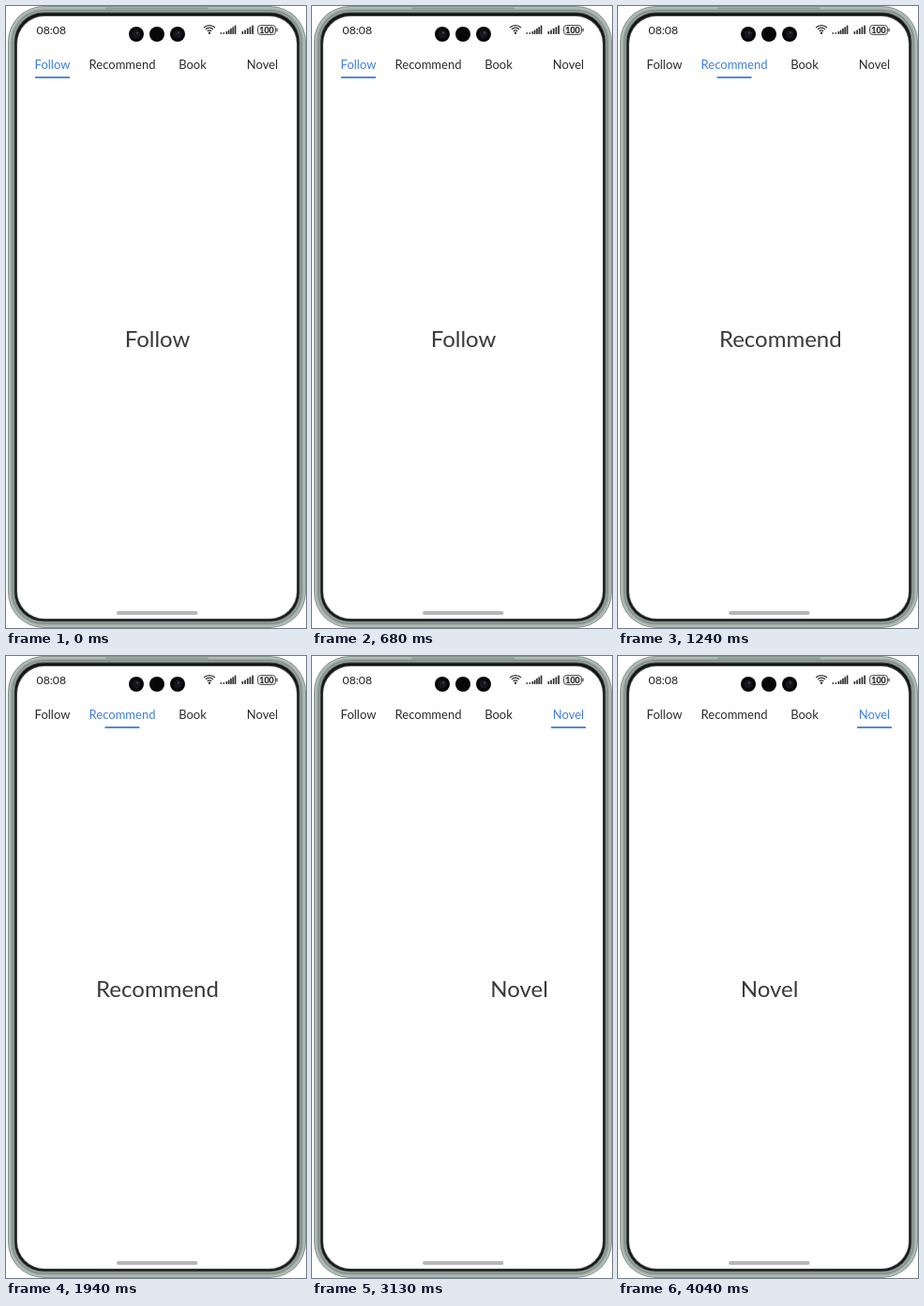
An HTML page with a canvas for the animation above (4.12 s loop, 320 px wide and 662 px high).

```html
<!DOCTYPE html>
<html lang="en">
<head>
<meta charset="utf-8">
<title>Tabs</title>
<style>
  html, body { margin: 0; width: 100%; height: 100%; overflow: hidden; background: #fff; }
  canvas { display: block; width: 320px; height: 662px; }
</style>
</head>
<body>
<canvas id="stage"></canvas>
<script>
const W = 320, H = 662, LOOP = 4120, STEP = 40;
const SCREEN = { x: 12, y: 11, w: 298, h: 641, r: 29 };
const MID = 161.5;
const TABS = [
  { name: 'Follow', x: 49.5 },
  { name: 'Recommend', x: 124 },
  { name: 'Book', x: 199 },
  { name: 'Novel', x: 273.5 }
];
// Each swipe: finger drag from start to release, then a decaying settle.
const SWIPES = [
  { start: 720, release: 1100, end: 1400 },
  { start: 1940, release: 2010, end: 2300 },
  { start: 2930, release: 3071, end: 3370 }
];
const DRAG = 0.35, TAU = 50;

const canvas = document.getElementById('stage');
const ctx = canvas.getContext('2d');
const dpr = window.devicePixelRatio || 1;
canvas.width = W * dpr;
canvas.height = H * dpr;

function box(x, y, w, h, r, fill) {
  ctx.beginPath();
  ctx.roundRect(x, y, w, h, r);
  if (fill) {
    ctx.fillStyle = fill;
    ctx.fill();
  }
}

function disc(x, y, r, fill) {
  ctx.beginPath();
  ctx.arc(x, y, r, 0, Math.PI * 2);
  ctx.fillStyle = fill;
  ctx.fill();
}

function label(str, x, y, size, fill, weight = 400) {
  ctx.font = `${weight} ${size}px Lato, "Open Sans", sans-serif`;
  ctx.fillStyle = fill;
  ctx.textAlign = 'center';
  ctx.fillText(str, x, y);
}

function progress(t, s) {
  if (t < s.start) return 0;
  if (t >= s.end) return 1;
  const q = s.start + Math.floor((t - s.start) / STEP) * STEP;
  if (q < s.release) {
    return DRAG * Math.pow((q - s.start) / (s.release - s.start), 1.6);
  }
  return 1 - (1 - DRAG) * Math.exp((s.release - q) / TAU);
}

function drawBody() {
  const rings = [
    [0, '#84928c'], [1, '#b3bfb9'], [2.5, '#a3b0aa'], [4, '#7f8c87'],
    [5.2, '#9ba6a2'], [6.5, '#59615e'], [7.5, '#121414']
  ];
  for (const [d, color] of rings) {
    box(2 + d, d, 318 - 2 * d, H - 2 * d, 38 - d, color);
  }
  box(106, 1.5, 110, 2, 1, '#8f9c96');
  box(SCREEN.x - 1, SCREEN.y - 1, SCREEN.w + 2, SCREEN.h + 2, SCREEN.r + 1, '#4c4e4e');
  box(SCREEN.x, SCREEN.y, SCREEN.w, SCREEN.h, SCREEN.r, '#fff');
}

function drawCameras() {
  for (const x of [139, 161, 183]) disc(x, 30, 8, '#070709');
  for (const x of [139, 183]) {
    disc(x, 30, 4.5, '#15171d');
    disc(x + 1, 28.5, 1.2, '#3b404b');
  }
}

function drawBars(x, gap, n) {
  for (let i = 0; i < n; i++) {
    const h = 3 + i * 6.5 / (n - 1);
    box(x + i * gap, 30 - h, 1.7, h, 0.4, '#333');
  }
}

function drawStatus() {
  label('08:08', 48.3, 30, 12.3, '#222');

  ctx.strokeStyle = '#333';
  ctx.lineWidth = 1.3;
  for (const r of [3.2, 5.8, 8.4]) {
    ctx.beginPath();
    ctx.arc(217, 29, r, -Math.PI * 0.75, -Math.PI * 0.25);
    ctx.stroke();
  }
  disc(217, 28.8, 1.2, '#333');

  for (const x of [228.5, 231.5]) box(x, 28, 1.6, 2, 0.3, '#555');
  drawBars(234.5, 2.3, 5);
  drawBars(251.5, 2.7, 5);

  box(268.5, 20.5, 19, 10, 3, '#e4e4e4');
  ctx.strokeStyle = '#555';
  ctx.lineWidth = 1;
  ctx.stroke();
  box(288.3, 23.5, 1.4, 4, 0.7, '#555');
  label('100', 278, 29, 9, '#222', 700);
}

function drawTabs(active) {
  TABS.forEach((tab, i) => {
    label(tab.name, tab.x, 66.5, 13, i === active ? '#3f7fe4' : '#2b2b2b');
  });
  box(TABS[active].x - 18.5, 75, 37, 2, 0.5, '#5389e6');
}

function drawPages(pos) {
  ctx.save();
  box(SCREEN.x, SCREEN.y, SCREEN.w, SCREEN.h, SCREEN.r);
  ctx.clip();
  TABS.forEach((tab, i) => {
    const off = (i - pos) * SCREEN.w;
    if (Math.abs(off) < SCREEN.w) label(tab.name, MID + off, 363, 24, '#3a3a3c');
  });
  ctx.restore();
}

function draw(now) {
  const t = now % LOOP;
  let pos = 0, active = 0;
  for (const s of SWIPES) {
    pos += progress(t, s);
    if (t >= s.release) active++;
  }
  ctx.setTransform(dpr, 0, 0, dpr, 0, 0);
  ctx.fillStyle = '#fff';
  ctx.fillRect(0, 0, W, H);
  drawBody();
  drawPages(pos);
  drawCameras();
  drawStatus();
  drawTabs(active);
  box(118, 644, 86.5, 4, 2, '#b7b4ba');
}

const began = performance.now();
function loop() {
  draw(performance.now() - began);
  requestAnimationFrame(loop);
}
loop();
</script>
</body>
</html>
```
